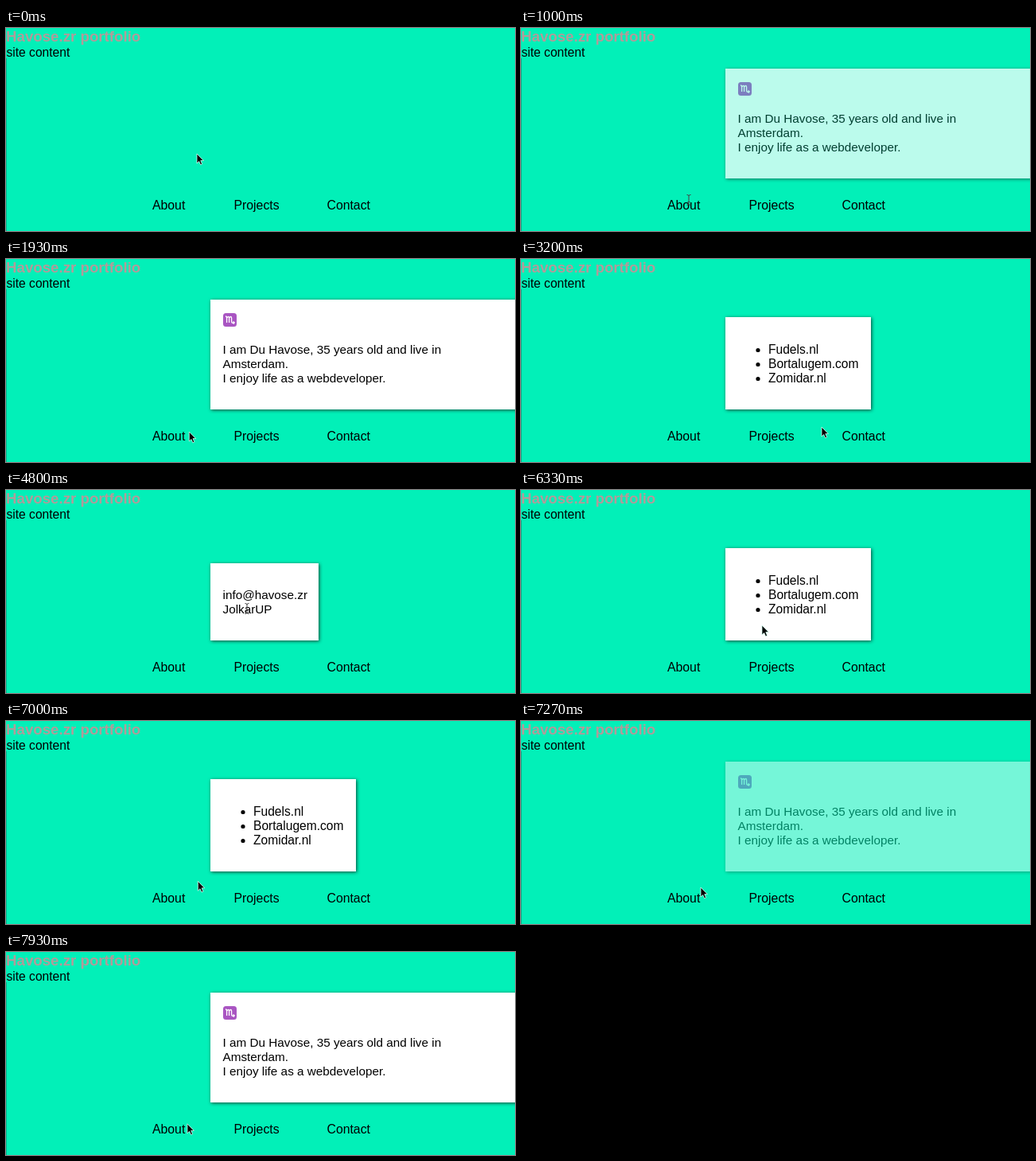
Recreate the animation shown at these times as an HTML page. Size 640x255 px, loop 8000 ms.

```html
<!DOCTYPE html>
<html lang="en">
<head>
<meta charset="utf-8">
<title>Portfolio menu</title>
<style>
  html, body { margin: 0; width: 100%; height: 100%; overflow: hidden; background: #02f0b8; }
  svg { display: block; width: 100%; height: 100%; font: 15.3px "Liberation Sans", Arial, sans-serif; }
  .title { font-size: 18.7px; font-weight: bold; fill: #b09c9a; }
  .menu { font-size: 15.8px; }
  .list { font-size: 15.6px; }
  .box { fill: #fff; filter: drop-shadow(1px 1px 2px rgba(0, 0, 0, .7)); }
</style>
</head>
<body>
<svg viewBox="0 0 640 255">
  <rect width="640" height="255" fill="#02f0b8"/>
  <path d="M.5 38V255" stroke="#0a7a62" stroke-opacity=".5"/>
  <text class="title" y="17">Havose.zr portfolio</text>
  <text class="list" x=".5" y="36">site content</text>

  <g class="popup" id="about">
    <rect class="box" x="257" y="51" width="400" height="138"/>
    <rect x="273" y="68" width="17" height="17" rx="3.5" fill="#a955c2"/>
    <path d="M276 72q1.6 0 1.6 2v6m0-6q2.6-3 3 0v6m0-6q2.6-3 3 0v4.5q0 2.5 3.4 1.5m-1.5-1.6 1.7 1.5-1.3 1.7"
      fill="none" stroke="#fff" stroke-width="1.3"/>
    <text x="272.5" y="119">I am Du Havose, 35 years old and live in</text>
    <text x="272.5" y="137">Amsterdam.</text>
    <text x="272.5" y="155">I enjoy life as a webdeveloper.</text>
  </g>

  <g class="popup list" id="projects">
    <rect class="box" x="257" y="73" width="183" height="116"/>
    <path d="M298 114.5h0m0 18h0m0 18h0" stroke="#000" stroke-width="5.2" stroke-linecap="round"/>
    <text x="311" y="119">Fudels.nl</text>
    <text x="311" y="137">Bortalugem.com</text>
    <text x="311" y="155">Zomidar.nl</text>
  </g>

  <g class="popup" id="contact">
    <rect class="box" x="257" y="92" width="136" height="97"/>
    <text x="272.5" y="137">info@havose.zr</text>
    <text x="272.5" y="155">JolkarUP</text>
  </g>

  <g class="menu">
    <text x="184" y="228">About</text>
    <text x="286.5" y="228">Projects</text>
    <text x="403.5" y="228">Contact</text>
  </g>

  <g id="pointer">
    <path id="arrow" d="M0 0V12L2.7 9.500 4.600 13.800 6.600 12.900 4.800 8.600H8.400Z" stroke="#d8fff4" stroke-width=".8"/>
    <path id="beam" d="M-2.5-6.5Q0-6.500 0-5Q0-6.500 2.500-6.500M0-5V5M-2.500 6.500Q0 6.500 0 5Q0 6.500 2.500 6.500M-1.500 2.500H1.500"
      fill="none" stroke="#444"/>
  </g>
</svg>
<script>
const LOOP = 8000, FADE = 300;
const byId = id => document.getElementById(id);
const popups = [...document.querySelectorAll('.popup')];

// Where the pointer is heading, and when it gets there
const stops = [
  { at: 0, x: 240, y: 158 },
  { at: 1000, x: 211, y: 216 },
  { at: 1800, x: 216, y: 217 },
  { at: 2300, x: 300, y: 217 },
  { at: 3200, x: 378, y: 211 },
  { at: 3700, x: 412, y: 216 },
  { at: 4800, x: 303, y: 149 },
  { at: 5700, x: 305, y: 214 },
  { at: 6330, x: 303, y: 170 },
  { at: 7270, x: 226, y: 209 },
  { at: LOOP, x: 228, y: 216 }
];

// Each popup fades in and stays until the next one replaces it
const openings = [
  { at: 868, id: 'about' },
  { at: 2150, id: 'projects' },
  { at: 3450, id: 'contact' },
  { at: 5600, id: 'projects' },
  { at: 7200, id: 'about' }
];

const easeOut = p => 1 - (1 - Math.min(1, p)) ** 2.25;
const smooth = p => p * p * (3 - 2 * p);

function pointerAt(time) {
  const next = stops.findIndex(stop => stop.at > time);
  const from = stops[next - 1], to = stops[next];
  const p = smooth((time - from.at) / (to.at - from.at));
  return { x: from.x + (to.x - from.x) * p, y: from.y + (to.y - from.y) * p };
}

function isOverText({ x, y }, openId) {
  const texts = document.querySelectorAll('.menu text' + (openId ? `, #${openId} text` : ''));
  return [...texts].some(text => {
    const box = text.getBBox();
    return x >= box.x && x < box.x + box.width && y >= box.y && y < box.y + box.height;
  });
}

function draw(time) {
  const open = openings.filter(opening => opening.at <= time).pop();
  for (const popup of popups)
    popup.style.opacity = popup.id === open?.id ? easeOut((time - open.at) / FADE) : 0;

  const pointer = pointerAt(time);
  const overText = isOverText(pointer, open?.id);
  byId('pointer').setAttribute('transform', `translate(${pointer.x} ${pointer.y})`);
  byId('arrow').style.opacity = overText ? 0 : 1;
  byId('beam').style.opacity = overText ? 1 : 0;
}

const begin = performance.now();
function tick() {
  draw((performance.now() - begin) % LOOP);
  requestAnimationFrame(tick);
}
tick();
</script>
</body>
</html>
```
